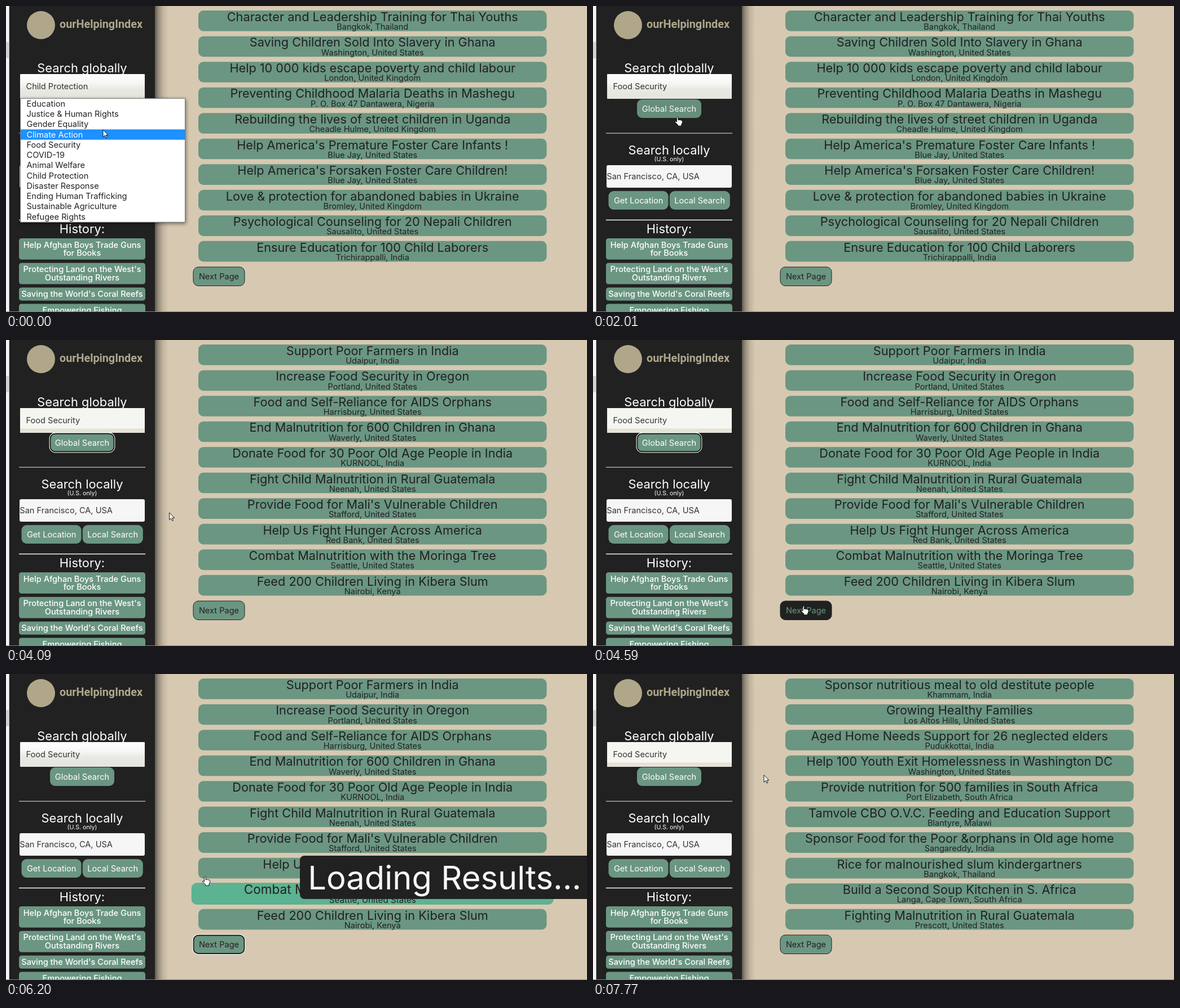
Animation of 1030 by 544 pixels, one loop 8 s. Source, as an HTML page:

```html
<!DOCTYPE html>
<html lang="en">
<head>
<meta charset="utf-8">
<title>Charity search</title>
<style>
  html, body { margin: 0; width: 100%; height: 100%; overflow: hidden; background: #d7c9b1; }
  svg { display: block; width: 1030px; height: 544px; }
  text { font: 400 14.58px Inter, sans-serif; font-optical-sizing: none; white-space: pre; }
  .mid { text-anchor: middle; }
  .head { font-size: 21.87px; }
  .title { font-size: 21.7px; }
  .card { font-weight: 500; }
  .brand { font: 700 19.8px Roboto, sans-serif; }
  .tiny { font-size: 10.7px; }
  .big { font-size: 57.9px; }
  #menu > rect:first-child { filter: drop-shadow(1px 2px 3px rgba(0, 0, 0, .5)); }
</style>
</head>
<body>
<svg id="stage" viewBox="0 0 1030 544" xmlns="http://www.w3.org/2000/svg"></svg>
<script>
const LOOP = 8000, FIRST_SWAP = 2550, SECOND_SWAP = 7770;
const GREEN = '#6b9682', DARK = '#212121', LIGHT = '#f7f7f7';
const MID = 649.75, PITCH = 45.53;

// title | place, one list for each search
const lists = [
  `Character and Leadership Training for Thai Youths|Bangkok, Thailand
Saving Children Sold Into Slavery in Ghana|Washington, United States
Help 10 000 kids escape poverty and child labour|London, United Kingdom
Preventing Childhood Malaria Deaths in Mashegu|P. O. Box 47 Dantawera, Nigeria
Rebuilding the lives of street children in Uganda|Cheadle Hulme, United Kingdom
Help America's Premature Foster Care Infants !|Blue Jay, United States
Help America's Forsaken Foster Care Children!|Blue Jay, United States
Love & protection for abandoned babies in Ukraine|Bromley, United Kingdom
Psychological Counseling for 20 Nepali Children|Sausalito, United States
Ensure Education for 100 Child Laborers|Trichirappalli, India`,
  `Support Poor Farmers in India|Udaipur, India
Increase Food Security in Oregon|Portland, United States
Food and Self-Reliance for AIDS Orphans|Harrisburg, United States
End Malnutrition for 600 Children in Ghana|Waverly, United States
Donate Food for 30 Poor Old Age People in India|KURNOOL, India
Fight Child Malnutrition in Rural Guatemala|Neenah, United States
Provide Food for Mali's Vulnerable Children|Stafford, United States
Help Us Fight Hunger Across America|Red Bank, United States
Combat Malnutrition with the Moringa Tree|Seattle, United States
Feed 200 Children Living in Kibera Slum|Nairobi, Kenya`,
  `Sponsor nutritious meal to old destitute people|Khammam, India
Growing Healthy Families|Los Altos Hills, United States
Aged Home Needs Support for 26 neglected elders|Pudukkottai, India
Help 100 Youth Exit Homelessness in Washington DC|Washington, United States
Provide nutrition for 500 families in South Africa|Port Elizabeth, South Africa
Tamvole CBO O.V.C. Feeding and Education Support|Blantyre, Malawi
Sponsor Food for the Poor &orphans in Old age home|Sangareddy, India
Rice for malnourished slum kindergartners|Bangkok, Thailand
Build a Second Soup Kitchen in S. Africa|Langa, Cape Town, South Africa
Fighting Malnutrition in Rural Guatemala|Prescott, United States`
].map(list => list.split('\n').map(line => line.split('|')));

const options = ['Education', 'Justice & Human Rights', 'Gender Equality', 'Climate Action',
  'Food Security', 'COVID-19', 'Animal Welfare', 'Child Protection', 'Disaster Response',
  'Ending Human Trafficking', 'Sustainable Agriculture', 'Refugee Rights'];

// time, x, y of the pointer's hot spot, pointer shape from then on
const path = [
  [0, 172, 220, 'arrow'], [60, 172, 221, 'arrow'], [300, 167, 235, 'arrow'], [560, 159, 252, 'arrow'],
  [780, 159, 252, 'arrow'], [1050, 144, 252.5, 'arrow'], [1230, 145, 255, 'beam'],
  [1510, 145, 254, 'beam'], [1650, 147, 240, 'arrow'], [1980, 150, 198, 'hand'], [2130, 147, 192.5, 'hand'],
  [3390, 148, 193, 'hand'], [3480, 162, 208, 'arrow'], [3600, 185, 225, 'arrow'], [3850, 235, 268, 'arrow'],
  [4030, 274, 292, 'arrow'], [4090, 289, 306, 'arrow'], [4150, 325, 361, 'arrow'],
  [4210, 342, 393, 'hand'], [4270, 358, 430, 'hand'], [4330, 366, 455, 'hand'], [4450, 373, 472.5, 'hand'],
  [5570, 373, 472.5, 'hand'], [5690, 370, 456, 'hand'], [5780, 366, 425, 'hand'], [5900, 361, 404, 'hand'],
  [6100, 356, 380, 'hand'], [6200, 352.5, 360, 'hand'], [6360, 348, 330, 'hand'], [6600, 345, 280, 'hand'],
  [6900, 342, 230, 'hand'], [7050, 328, 200, 'arrow'], [7210, 303, 179.5, 'arrow'], [LOOP, 303, 179.5, 'arrow']
];

// row, pointer enters, pointer leaves
const rowHovers = [
  [8, 4200, 4240], [9, 4260, 4330], [9, 5700, 5860], [8, 5880, 6185],
  [7, 6185, 6360], [6, 6400, 6590], [5, 6640, 6830], [4, 6900, 7045]
];

const escapeText = s => s.replace(/&/g, '&amp;');
const rect = (x, y, w, h, r, fill, more = '') =>
  `<rect x="${x}" y="${y}" width="${w}" height="${h}" rx="${r}" fill="${fill}" ${more}/>`;
const text = (x, y, s, fill = '#fff', cls = 'mid', more = '') =>
  `<text x="${x}" y="${y}" fill="${fill}" class="${cls}" ${more}>${escapeText(s)}</text>`;
const group = (id, body) => `<g id="${id}">${body}</g>`;

function button(id, x, y, w, h, label, ink, border = '') {
  const cx = x + w / 2, base = y + h / 2 + 5.2;
  return rect(x, y, w, h, 9, GREEN, border) + text(cx, base, label, ink) +
    group(id + 'Ring', rect(x - .8, y - .8, w + 1.6, h + 1.6, 10, 'none', 'stroke="#fff" stroke-width="1.2"') +
      rect(x + .6, y + .6, w - 1.2, h - 1.2, 8.5, 'none', 'stroke="#151515" stroke-width="1.6"')) +
    group(id + 'Hover', rect(x, y, w, h, 9, DARK) + text(cx, base, label, GREEN));
}

const row = () => `<g class="row">${rect(-308.75, -18.3, 617.5, 36.6, 9, GREEN)}` +
  rect(-308.75, -18.3, 617.5, 36.6, 9, '#5cb491', 'opacity="0"') +
  text(0, .5, '', DARK, 'mid title') + text(0, 15.6, '', DARK) + '</g>';

const card = (y, h, ...lines) => rect(23, y, 224, h, 4.5, GREEN) +
  lines.map((s, i) => text(135, y + 16.6 + i * 14.6, s, '#fff', 'mid card')).join('');

const stop = (at, color, alpha = 1) =>
  `<stop offset="${at}" stop-color="${color}" stop-opacity="${alpha}"/>`;

const sidebar =
  rect(0, 0, 5, 544, 0, '#f4f4f4') + rect(0, 64, 5, 29, 0, '#d2d2d2') + rect(5, 0, 1, 544, 0, '#b5b5b5') +
  rect(264, 0, 24, 544, 0, 'url(#shade)') + rect(6, 0, 258, 544, 0, DARK) +
  '<circle cx="62" cy="34" r="25" fill="#b0a78b"/>' + text(95, 39, 'ourHelpingIndex', '#b0a78b', 'brand') +
  text(135, 118, 'Search globally', '#fff', 'mid head') +
  rect(25, 121, 221, 44, 1, 'url(#glossy)') +
  group('flat', rect(25, 121, 221, 44, 1, '#f5f5f1') + rect(25, 157.5, 221, 7, 0, '#e6e3d6')) +
  text(35.5, 148, '', '#333', '', 'id="choice"') +
  button('global', 78, 166, 114, 33, 'Global Search', '#fff') +
  rect(23, 225.7, 224, 1, 0, '#e8e8e8') +
  text(135, 264, 'Search locally', '#fff', 'mid head') + text(135, 276, '(U.S. only)', '#fff', 'mid tiny') +
  rect(24, 283, 222, 40, 3, '#f6f6f6') + text(24.3, 308, 'San Francisco, CA, USA', '#333', '') +
  rect(27.5, 329, 106, 33, 9, GREEN) + text(80.7, 350.7, 'Get Location') +
  rect(135.8, 329, 107, 33, 9, GREEN) + text(189.2, 350.7, 'Local Search') +
  rect(23, 379.7, 224, 1.5, 0, '#f4f4f4') + text(135, 404, 'History:', '#fff', 'mid head') +
  card(413, 37.8, 'Help Afghan Boys Trade Guns', 'for Books') +
  card(456.7, 37.8, "Protecting Land on the West's", 'Outstanding Rivers') +
  card(500.4, 23.4, "Saving the World's Coral Reefs") +
  card(529.5, 30, 'Empowering Fishing');

const menu = rect(25.5, 164.3, 292, 220, 0, '#fff', 'stroke="#777"') +
  rect(26, 219.4, 291, 18.3, 0, '#1e90ff', 'id="pick"') +
  options.map((s, i) => text(36.5, 178.8 + i * 18.25, s, '#222', 'option')).join('');

const edge = 'stroke="#000" stroke-width=".9" stroke-linejoin="round"';
const pointers =
  `<path id="arrow" d="M0 0V12.8L3 10 5 14.5 7 13.6 5 9.3H9Z" fill="#fff" ${edge}/>` +
  `<path id="hand" d="M-1 1.2Q.2-.8 1.6 1.2V6l1-.6 1.4.5 1.3-.3 1.3.8h1.4l1 1.2V11l-1.6 3v2.3H1v-2L-4 9.6Q-4.2 7.6-2.4 8L-1 9.4Z" fill="#fff" ${edge}/>` +
  group('beam', ['#fff" stroke-width="2.6', '#222" stroke-width="1'].map(s =>
    `<path d="M-2.5-7.5H2.5M0-7.5V7.5M-2.5 7.5H2.5" fill="none" stroke="${s}"/>`).join(''));

document.getElementById('stage').innerHTML =
  `<defs><linearGradient id="shade">${stop(0, '#000', .55)}${stop(.25, '#000', .3)}${stop(.6, '#000', .1)}${stop(1, '#000', 0)}</linearGradient>
  <linearGradient id="glossy" x2="0" y2="1">${stop(0, '#fff')}${stop(.35, '#f7f7f5')}${stop(.6, '#e9e9e4')}${stop(1, '#e4e5df')}</linearGradient></defs>` +
  rect(0, 0, 1030, 544, 0, '#d7c9b1') + lists[0].map(row).join('') +
  button('next', 332, 464, 91, 33.5, 'Next Page', DARK, `stroke="${DARK}"`) +
  sidebar + rect(0, 543, 1030, 1, 0, '#8b8375') +
  group('loading', rect(521, 323, 530, 77, 8, DARK) + text(535.3, 383, 'Loading Results...', LIGHT, 'big')) +
  group('menu', menu) + group('pointer', pointers);

const $ = id => document.getElementById(id);
const rows = [...document.querySelectorAll('.row')];
const optionTexts = [...document.querySelectorAll('.option')];
const show = (id, on) => { $(id).style.display = on ? '' : 'none'; };
const within = (t, a, b) => t >= a && t < b;
const ramp = (t, from) => Math.min(1, Math.max(0, (t - from) / 200));
const ease = k => k * k * (3 - 2 * k);
const hover = (t, from, to) => ease(Math.max(0, ramp(t, from) - ramp(t, to)));

let shown = -1;
function fillRows(n) {
  if (n === shown) return;
  shown = n;
  rows.forEach((g, i) => g.querySelectorAll('text').forEach((el, j) => { el.textContent = lists[n][i][j]; }));
}

function movePointer(t) {
  const i = path.findLastIndex(p => p[0] <= t);
  const [t0, x0, y0, shape] = path[i], [t1, x1, y1] = path[i + 1];
  const k = (t - t0) / (t1 - t0);
  const x = x0 + (x1 - x0) * k, y = y0 + (y1 - y0) * k;
  $('pointer').setAttribute('transform', `translate(${x} ${y})`);
  for (const id of ['arrow', 'hand', 'beam']) show(id, id === shape);
  return y;
}

function render(t) {
  const y = movePointer(t);
  fillRows(t < FIRST_SWAP ? 0 : t < SECOND_SWAP ? 1 : 2);
  rows.forEach((g, i) => {
    const k = rowHovers.reduce((m, [r, a, b]) => r === i ? Math.max(m, hover(t, a, b)) : m, 0);
    g.setAttribute('transform', `translate(${MID} ${26.4 + i * PITCH}) scale(${1 + .04 * k})`);
    g.children[1].setAttribute('opacity', k);
  });

  const open = t < 1230, picked = y > 237.6 ? 4 : 3;
  show('menu', open);
  $('pick').setAttribute('y', 164.65 + picked * 18.25);
  optionTexts.forEach((el, i) => el.setAttribute('fill', i === picked ? '#fff' : '#222'));
  $('choice').textContent = open ? 'Child Protection' : 'Food Security';
  show('flat', within(t, 2430, 5640) || t >= SECOND_SWAP);

  $('globalHover').setAttribute('opacity', hover(t, 1980, 3430));
  show('globalRing', within(t, 2430, 4740));
  $('nextHover').setAttribute('opacity', hover(t, 4370, 5660));
  show('nextRing', within(t, 4740, SECOND_SWAP));
  show('loading', within(t, 4800, SECOND_SWAP));
}

const start = performance.now();
function tick() {
  render((performance.now() - start) % LOOP);
  requestAnimationFrame(tick);
}
tick();
</script>
</body>
</html>
```
